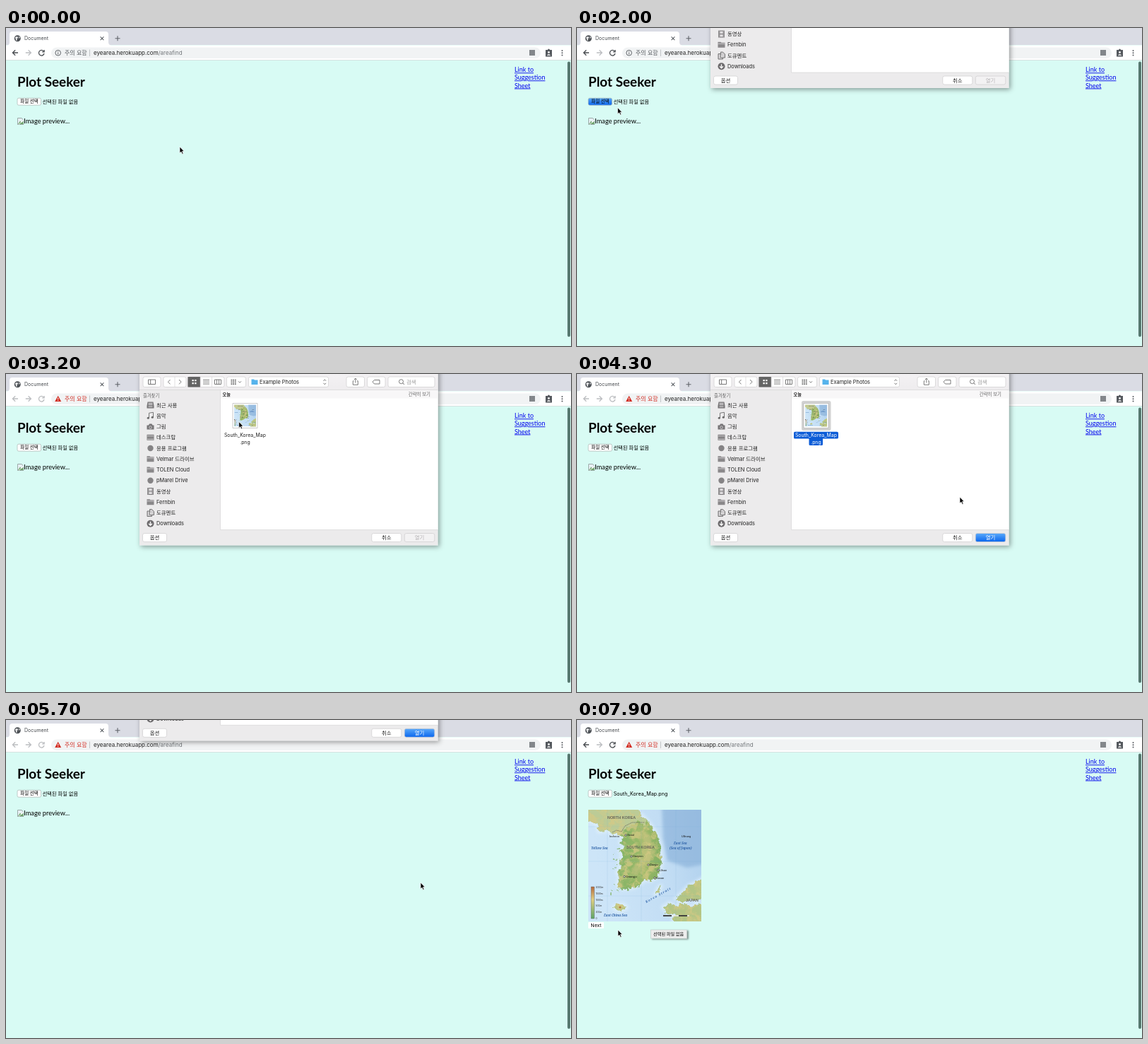
These frames come from a looping animation (800x450 px, 8 s). An HTML page:

```html
<!DOCTYPE html>
<html lang="ko">
<head>
<meta charset="utf-8">
<title>Document</title>
<style>
html, body { margin: 0; width: 100%; height: 100%; overflow: hidden; }
svg { display: block; }
#stage { width: 800px; height: 450px; background: #d8fbf4; }
text { font: 7.4px Inter, 'Noto Sans CJK KR', sans-serif; fill: #222; white-space: pre; }
.page { font-family: Lato, sans-serif; font-size: 9.2px; fill: #000; }
.link { font-size: 9px; fill: #0000ee; text-decoration: underline; }
.mid { text-anchor: middle; }
.line { fill: none; stroke: #5f6368; stroke-width: 1.3; }
.btn { fill: #fff; stroke: #cfcdcf; stroke-width: .7; }
.glyph { fill: none; stroke: #6a6a6a; stroke-width: .9; }
.sea { font: italic bold 4.4px 'Noto Serif', serif; fill: #2d62a8; }
.country { font: bold 5.4px 'Liberation Sans', sans-serif; fill: #66665a; }
.town { font: 3.9px 'Liberation Sans', sans-serif; fill: #111; }
</style>
</head>
<body>
<svg id="stage" viewBox="0 0 800 450" xmlns="http://www.w3.org/2000/svg">
<defs>
  <linearGradient id="blue" x2="0" y2="1"><stop stop-color="#5aa9fa"/><stop offset="1" stop-color="#0a66ee"/></linearGradient>
  <linearGradient id="bar" x2="0" y2="1"><stop stop-color="#f6f4f6"/><stop offset="1" stop-color="#eeecee"/></linearGradient>
  <linearGradient id="water" x2="1" y2="-.15"><stop stop-color="#cde5f8"/><stop offset=".6" stop-color="#c2ddf4"/><stop offset="1" stop-color="#b0d0ed"/></linearGradient>
  <linearGradient id="land" x2="1"><stop offset=".3" stop-color="#86b467"/><stop offset=".5" stop-color="#9cb968"/><stop offset=".64" stop-color="#7fae62"/></linearGradient>
  <linearGradient id="height" x2="0" y2="1"><stop stop-color="#b56a3c"/><stop offset=".4" stop-color="#e0cf83"/><stop offset="1" stop-color="#5da565"/></linearGradient>
  <filter id="shade" x="-10%" y="-10%" width="120%" height="125%"><feDropShadow dy="2" stdDeviation="3.5" flood-opacity=".4"/></filter>
  <filter id="tipShade" x="-10%" y="-30%" width="120%" height="190%"><feDropShadow dy="1.2" stdDeviation="1.3" flood-opacity=".45"/></filter>
  <filter id="soft" x="-20%" y="-20%" width="140%" height="140%"><feGaussianBlur stdDeviation="2"/></filter>
  <filter id="rough" color-interpolation-filters="sRGB">
    <feTurbulence type="fractalNoise" baseFrequency=".16" numOctaves="3" seed="5"/>
    <feDisplacementMap in="SourceGraphic" scale="8" xChannelSelector="R" yChannelSelector="G"/>
  </filter>
  <filter id="relief" x="0" y="0" width="1" height="1" color-interpolation-filters="sRGB">
    <feTurbulence type="fractalNoise" baseFrequency=".1" numOctaves="4" seed="3"/>
    <feColorMatrix values="0 0 0 0 .84  0 0 0 0 .79  0 0 0 0 .52  4 0 0 0 -1.75"/>
  </filter>
  <path id="korea" d="M-6 -6H66L75 8 82 14 90 24 96 34 101 48 103 62 104 74 102 86 97 95 89 100 80 99 73 105 64 110 53 112 44 110 41 104 45 97 41 88 47 80 43 73 49 66 45 59 52 53 45 46 49 39 42 34 34 36 28 29 15 31 12 20 -6 13Z"/>
  <path id="japan" d="M166 95 151 104 143 107 137 114 129 121 124 126 133 130 145 127 153 129 166 124ZM106 138 115 132 124 137 133 132 146 137 155 132 166 137V164H119L122 149 113 147ZM103 106 99 112 96 119 100 116ZM36 138 42 134 50 134 54 138 49 142 40 142Z"/>
  <clipPath id="shore"><use href="#korea"/><use href="#japan"/></clipPath>
  <symbol id="map" viewBox="0 0 160 158">
    <rect width="160" height="158" fill="url(#water)"/>
    <path d="M104 -5 170 -5V76L140 82 112 72 106 40Z" fill="#84add7" opacity=".6" filter="url(#soft)"/>
    <g fill="none" stroke="#e2f2fc" stroke-width="5" filter="url(#soft)" opacity=".8"><use href="#korea"/><use href="#japan"/></g>
    <g filter="url(#rough)">
      <g clip-path="url(#shore)">
        <rect x="-6" y="-6" width="172" height="170" fill="url(#land)"/>
        <path d="M110 90H166V164H30V130H100Z" fill="#b3c585"/>
        <path d="M-6 -6H66L82 14 80 22 70 17 55 25 44 36 -6 36Z" fill="#bccb96"/>
        <path d="M72 24 90 38 94 60 88 72 66 94 60 88 78 66Z" fill="#d0c687" opacity=".55" filter="url(#soft)"/>
        <rect x="-6" y="-6" width="172" height="170" filter="url(#relief)" opacity=".75"/>
      </g>
      <g id="isles" fill="#86b46b"></g>
    </g>
    <path d="M34 32 40 29 47 31 52 23 62 18 80 18" fill="none" stroke="#555" stroke-width=".6" stroke-dasharray="2 .6"/>
    <circle cx="45" cy="138" r="1.6" fill="#b2793c"/>
    <path d="M0 24H160M0 73H160M0 122H160M27 0V158M75 0V158M124 0V158" fill="none" stroke="#6f9fc8" stroke-width=".35" opacity=".4"/>
    <rect x="4" y="109" width="4.5" height="45" fill="url(#height)" stroke="#555" stroke-width=".4"/>
    <path d="M106 150H143" stroke="#eee" stroke-width="1.4"/><path d="M106 150H143" stroke="#111" stroke-width="1.4" stroke-dasharray="12 10"/>
    <g id="labels"></g>
    <text class="sea" transform="translate(82 132) rotate(-29)" style="letter-spacing:1.1px">Korea Strait</text>
  </symbol>
</defs>

<g id="browser">
  <path d="M0 0H800V24H0Z" fill="#dadce4"/>
  <path d="M0 24.5H2Q5 24 5 20V9Q5 5 9 5H141Q145 5 145 9V20Q145 24 149 24.5H800V45.5H0Z" fill="#fff"/>
  <path d="M0 45.5H800" stroke="#d0dcda" stroke-width=".8"/>
  <circle cx="16.3" cy="14.7" r="4.5" fill="#4d5156"/>
  <path d="M13 13 16 12 17 14 15 15.5 16 17 14.5 18ZM18 11.5 19.7 13.5 18.5 15Z" fill="#fff"/>
  <text x="26" y="17.2" style="font-size:7px;fill:#45494d">Document</text>
  <path d="M133.6 12.4 138.4 17.2M138.4 12.4 133.6 17.2M154.5 14.7H161.5M158 11.2V18.2" class="line" style="stroke-width:1.1"/>
  <path id="back" d="M17 35H9.5M13.2 31.2 9.4 35 13.2 38.8" class="line"/>
  <path id="reload" d="M53.2 32.8A3.8 3.8 0 1 0 54 36M54.1 31V33.9H51.2" class="line"/>
  <path d="M27.8 35H35.3M31.6 31.2 35.4 35 31.6 38.8" class="line" style="stroke:#bcbec1"/>
  <rect x="64" y="27.5" width="693" height="15.6" rx="7.8" fill="#f1f3f4"/>
  <g id="info"><circle cx="73.7" cy="35.2" r="3.8" class="line" style="stroke-width:1"/><path d="M73.7 34.6V37.4M73.7 32.8V33.8" class="line" style="stroke-width:1"/></g>
  <g id="warn"><path d="M73.7 30.8 78.2 39H69.2Z" fill="#d22d22"/><path d="M73.7 33.6V36.2M73.7 37V38" stroke="#fff"/></g>
  <text id="notice" x="83" y="38" style="font-size:8px">주의 요함</text>
  <path d="M118.5 30.5V40" stroke="#b5b8bc" stroke-width=".8"/>
  <text x="124" y="38" style="font-size:8px">eyearea.herokuapp.com<tspan fill="#73777b">/areafind</tspan></text>
  <rect x="741" y="31" width="8" height="8" fill="#83878b"/>
  <path d="M764 31H767A1.5 1.5 0 0 1 770 31H773V40.4H764Z" fill="#55595e"/>
  <circle cx="768.5" cy="34.4" r="1.4" fill="#fff"/><path d="M765.7 38.8Q768.5 35.4 771.3 38.8Z" fill="#fff"/>
  <g fill="#55595e"><circle cx="787.5" cy="32" r="1"/><circle cx="787.5" cy="35.2" r="1"/><circle cx="787.5" cy="38.4" r="1"/></g>
</g>

<g id="content">
  <rect x="795" y="47.5" width="4" height="389.5" rx="2" fill="#56786f"/>
  <text x="16" y="83" class="page" style="font-size:18.9px;font-weight:bold">Plot Seeker</text>
  <text class="page link" x="720" y="62.3">Link to</text>
  <text class="page link" x="720" y="73.3">Suggestion</text>
  <text class="page link" x="720" y="84.5">Sheet</text>
  <rect id="pick" x="16" y="99.2" width="33.5" height="10" rx="2" stroke="#a9b5b2" stroke-width=".7"/>
  <text x="33" y="106.4" class="mid" style="font-size:6.5px;font-weight:500;fill:#000">파일 선택</text>
  <text id="chosen" x="51.7" y="106.6" style="font-size:7.2px;fill:#000"></text>
  <g id="broken">
    <path d="M16.5 127.5H22L24.8 130V136.5H16.5Z" fill="#e8f1f5" stroke="#8a9794" stroke-width=".8"/>
    <path d="M17 136 20 131.5 22 134 24.5 132V136Z" fill="#6fa66c"/><path d="M18 136.5 25 130" stroke="#fff"/>
    <text x="25.3" y="135" class="page">Image preview...</text>
  </g>
  <g id="loaded">
    <use href="#map" x="16" y="127" width="160" height="158"/>
    <rect x="16" y="286" width="22" height="9" rx="1" fill="#fff"/>
    <text x="27" y="292.8" class="mid" style="font-size:6.7px;fill:#000">Next</text>
  </g>
</g>

<g id="sheet">
  <path d="M189 -10H611.5V242.5H189Z" fill="#ecebec" filter="url(#shade)"/>
  <path d="M189 -10H611.5V22.5H189Z" fill="url(#bar)"/>
  <path d="M303.5 22.5H611.5V220.5H303.5Z" fill="#fff"/>
  <path d="M189 22.5H611.5M303.5 22.5V220.5H611.5" fill="none" stroke="#d6d4d6" stroke-width=".7"/>
  <g id="tools">
    <g id="boxes"></g>
    <path d="M257.5 4H275V18.5H257.5Z" id="mode" fill="#646464"/>
    <path d="M275.2 4V18.5M291.5 4V18.5M239 4V18.5" stroke="#d4d2d4" stroke-width=".7"/>
    <path class="glyph" d="M201.5 8H211.5V14.5H201.5ZM204.7 8V14.5M232.5 8 229.5 11.2 232.5 14.4M245 8 248 11.2 245 14.4M279 8.5H288M279 11.2H288M279 14H288M295.5 8H304.5V14.5H295.5ZM298.5 8V14.5M301.5 8V14.5M329 10.3 331 12.3 333 10.3M449.5 9.8 451.3 7.8 453.1 9.8M449.5 12.8 451.3 14.8 453.1 12.8M492.5 9.8H491.3V15.3H498.3V9.8H497M494.8 12.5V6.2M492.8 8 494.8 6 496.8 8M519 11.2 521.5 8.5H529V14H521.5ZM561.9 12.9 564 15"/>
    <circle cx="559.5" cy="10.7" r="3" class="glyph"/>
    <path id="dots" d="M263.5 9.2H269.5M263.5 13.2H269.5" stroke-width="2.2" stroke-dasharray="2.3 1.4" fill="none"/>
    <path d="M318.5 8.6H326M318.5 11.4H326M318.5 14.2H326" stroke="#6a6a6a" stroke-width="1.8" stroke-dasharray="1.8 .9"/>
    <path d="M347.5 7.5H351L352 8.6H356.5V15H347.5Z" fill="#56b3ec"/>
    <text x="359" y="13.9">Example Photos</text>
    <text x="567" y="13.9" style="fill:#999">검색</text>
  </g>
  <text x="194" y="32.7" style="font-size:6.3px;fill:#666">즐겨찾기</text>
  <g id="places"></g>
  <g id="files">
    <path d="M304 23H611V34.5H304Z" fill="#f8f7f8"/>
    <text x="306.5" y="31" style="font-size:6.2px;font-weight:bold">오늘</text>
    <text x="601" y="31" text-anchor="end" style="font-size:6.4px;fill:#666">간략히 보기</text>
    <rect id="glow" x="318" y="38" width="41.5" height="42" rx="2.5" fill="#d2d2d2"/>
    <path d="M321 41.5H356V76.5H321Z" fill="#fff" stroke="#aaa" stroke-width=".6"/>
    <use href="#map" x="323" y="43.5" width="31" height="31"/>
    <path id="tag" d="M308.5 81.8H368Q370 81.8 370 83.5V90Q370 91.6 368 91.6H348V99.5Q348 101 346.5 101H330Q328.5 101 328.5 99.5V91.6H308.5Q307 91.6 307 90V83.5Q307 81.8 308.5 81.8Z" fill="#0b5cd7"/>
    <g id="name"><text x="338.4" y="89.3" class="mid" style="font-size:6.9px;fill:inherit">South_Korea_Map</text><text x="338.4" y="98.8" class="mid" style="font-size:6.9px;fill:inherit">.png</text></g>
  </g>
  <rect class="btn" x="193.5" y="225.5" width="34" height="12" rx="2.5"/><text x="210.5" y="234.2" class="mid">옵션</text>
  <rect class="btn" x="517.8" y="225.5" width="42" height="12" rx="2.5"/><text x="538.8" y="234.2" class="mid">취소</text>
  <rect class="btn" id="open" x="564.3" y="225.5" width="42.5" height="12" rx="2.5"/><text id="openText" x="585.6" y="234.2" class="mid">열기</text>
</g>

<g id="tip">
  <rect x="104.5" y="297" width="51" height="12" fill="#ededed" stroke="#c2c8c6" stroke-width=".6" filter="url(#tipShade)"/>
  <text x="129.7" y="305.2" class="mid" style="font-size:6.2px;font-weight:500;fill:#000">선택된 파일 없음</text>
</g>
<path id="cursor" d="M0 0V9L2.1 7.2 3.6 10.4 5.1 9.7 3.6 6.6H6.2Z" fill="#000" stroke="#fff" stroke-width=".7"/>
</svg>

<script>
const $ = id => document.getElementById(id);
const fill = (id, html) => $(id).innerHTML = html;
const show = (id, on) => $(id).style.display = on ? '' : 'none';
const ease = p => p * p * (3 - 2 * p);
const ramp = (t, a, b) => ease(Math.min(1, Math.max(0, (t - a) / (b - a))));

let seed = 7;
const rnd = () => (seed = seed * 16807 % 2147483647) / 2147483647;
const times = (n, f) => Array.from({ length: n }, (_, i) => f(i)).join('');

// Coastal islands and map labels
fill('isles', times(36, i => {
  const south = i < 22;
  const x = south ? 32 + rnd() * 42 : 36 + rnd() * 8, y = south ? 117 - (x - 32) * .2 + rnd() * 5 - 4 : 48 + rnd() * 58;
  return `<circle cx="${x}" cy="${y}" r="${.5 + rnd() * .9}"/>`;
}));
const label = (cls, x, y, s) => `<text class="${cls}" x="${x}" y="${y}">${s}</text>`;
const towns = [[53, 37, 'Seoul'], [61, 67, 'Daejeon'], [85, 79, 'Daegu'], [99, 86.5, 'Ulsan'], [94, 97.5, 'Busan'], [51, 95.5, 'Gwangju']];
fill('labels',
  label('country', 27, 13, 'NORTH KOREA') + label('country', 54, 55, 'SOUTH KOREA') + label('country', 138, 129.5, 'JAPAN') +
  label('sea', 4, 56, 'Yellow Sea') + label('sea', 121, 49, 'East Sea') + label('sea', 115, 55.5, '(Sea of Japan)') + label('sea', 22, 151, 'East China Sea') +
  label('town', 30, 39, 'Incheon') + label('town', 132, 39, 'Ulleung') +
  towns.map(([x, y, s]) => `<circle cx="${x}" cy="${y - 1}" r="1.2" fill="#fff" stroke="#111" stroke-width=".6"/>` + label('town', x + 2.2, y + .4, s)).join('') +
  ['2000m', '1500m', '1000m', '500m', '200m', '0'].map((s, i) => `<text x="10.5" y="${111 + i * 8.8}" style="font-size:3.2px">${s}</text>`).join(''));

// Dialog toolbar and sidebar
fill('boxes', [[194, 25], [223, 32], [257.5, 51.5], [312.5, 27], [343.5, 113], [482, 25.5], [511.5, 25.5], [541, 66]]
  .map(([x, w]) => `<rect class="btn" x="${x}" y="4" width="${w}" height="14.5" rx="2.5"/>`).join(''));
const folder = '<path d="M-5-4H-1L0-3H5V4H-5Z" fill="#8a888a"/><path d="M-5-1.5H5" stroke="#ebe9eb" stroke-width=".7"/>';
const disc = '<circle r="4.2" fill="#858385"/>';
const places = [
  ['최근 사용', '<path d="M-4-4.5H4L5 1V4.5H-5V1Z" fill="#777577"/><path d="M-3-2.5H3M-3-.5H3M-3 2.2H3" stroke="#ebe9eb"/>'],
  ['음악', '<path d="M-2 3V-4L4-5V2" class="glyph"/><circle cx="-3.2" cy="3" r="1.6" fill="#6a6a6a"/><circle cx="2.8" cy="2" r="1.6" fill="#6a6a6a"/>'],
  ['그림', '<path d="M-5-2H-2.5L-1.5-4H2L3-2H5V4H-5Z" fill="#777577"/><circle cy="1" r="1.8" fill="none" stroke="#ebe9eb" stroke-width=".7"/>'],
  ['데스크탑', '<path d="M-5-4H5V4H-5Z" fill="#858385"/><path d="M-4-2H4M-4 2.5H4" stroke="#ebe9eb" stroke-width="1.1" stroke-dasharray="1.5 .7"/>'],
  ['응용 프로그램', disc],
  ['Velmar 드라이브', folder],
  ['TOLEN Cloud', folder],
  ['pMarel Drive', disc],
  ['동영상', '<path d="M-4.5-5H4.5V5H-4.5Z" fill="#777577"/><path d="M-2.2-4H2.2V-.5H-2.2ZM-2.2.5H2.2V4H-2.2Z" fill="#dedcde"/><path d="M-3.4-4.5V5M3.4-4.5V5" stroke="#ebe9eb" stroke-dasharray="1 1"/>'],
  ['Fernbin', folder],
  ['도큐멘트', '<path d="M-1-5H2L5-2V3H-1ZM-1-2.5H-4.5V5H2V3" class="glyph" style="fill:#cfcdcf"/>'],
  ['Downloads', '<circle r="5" fill="#6d6b6d"/><path d="M0-3V2.5M-2.4 0 0 2.6 2.4 0" fill="none" stroke="#fff" stroke-width="1.3"/>']
];
fill('places', places.map(([s, icon], i) => {
  const y = 44 + i * 15.25;
  return `<g transform="translate(204.5 ${y})">${icon}</g><text x="213" y="${y + 2.7}">${s}</text>`;
}).join(''));

// Pointer stops: time, x, y
const path = [[100, 246, 168], [1000, 27, 102], [1900, 27, 102], [2200, 145, 143], [2500, 145, 143], [3300, 338, 64],
  [3900, 338, 64], [4300, 542, 174], [4900, 587, 230], [5700, 587, 230], [6300, 586, 230], [7100, 586, 230], [7500, 98, 278], [7600, 98, 278], [7900, 58, 297]];
function pointer(t) {
  const i = path.findIndex(p => p[0] > t);
  if (i === 0) return path[0].slice(1);
  if (i < 0) return path.at(-1).slice(1);
  const [a, x, y] = path[i - 1], [b, u, v] = path[i], k = ramp(t, a, b);
  return [x + (u - x) * k, y + (v - y) * k];
}

function draw(t) {
  const away = t >= 2400 && t < 5800, listed = t >= 2400, picked = t >= 3400, done = t >= 6000;
  const down = ramp(t, 1880, 2180) - ramp(t, 5450, 5770);
  show('sheet', down > 0);
  $('sheet').setAttribute('transform', `translate(0 ${243 * (down - 1)})`);
  $('tools').style.opacity = listed ? 1 : .5;
  $('mode').setAttribute('fill', listed ? '#646464' : '#d9d7d9');
  $('dots').setAttribute('stroke', listed ? '#fff' : '#666');
  show('files', listed);
  show('glow', picked);
  show('tag', picked);
  $('name').style.fill = picked ? '#fff' : '#222';
  $('open').style.fill = picked ? 'url(#blue)' : '#f3f2f3';
  $('openText').style.fill = picked ? '#fff' : '#b5b3b5';

  for (const id of ['back', 'reload']) $(id).style.stroke = away ? '#bcbec1' : '#4a4e52';
  show('info', !listed);
  show('warn', listed);
  $('notice').style.fill = listed ? '#d22d22' : '#55595e';
  $('pick').setAttribute('fill', t >= 1800 && t < 2400 ? 'url(#blue)' : '#fff');
  $('chosen').textContent = done ? 'South_Korea_Map.png' : '선택된 파일 없음';
  show('broken', !done);
  show('loaded', done);
  show('tip', t >= 7700);
  $('cursor').setAttribute('transform', `translate(${pointer(t)})`);
}

const start = performance.now();
function tick(now) {
  draw(Math.floor(Math.max(0, now - start) % 8000 / 100) * 100);
  requestAnimationFrame(tick);
}
draw(0);
requestAnimationFrame(tick);
</script>
</body>
</html>
```
